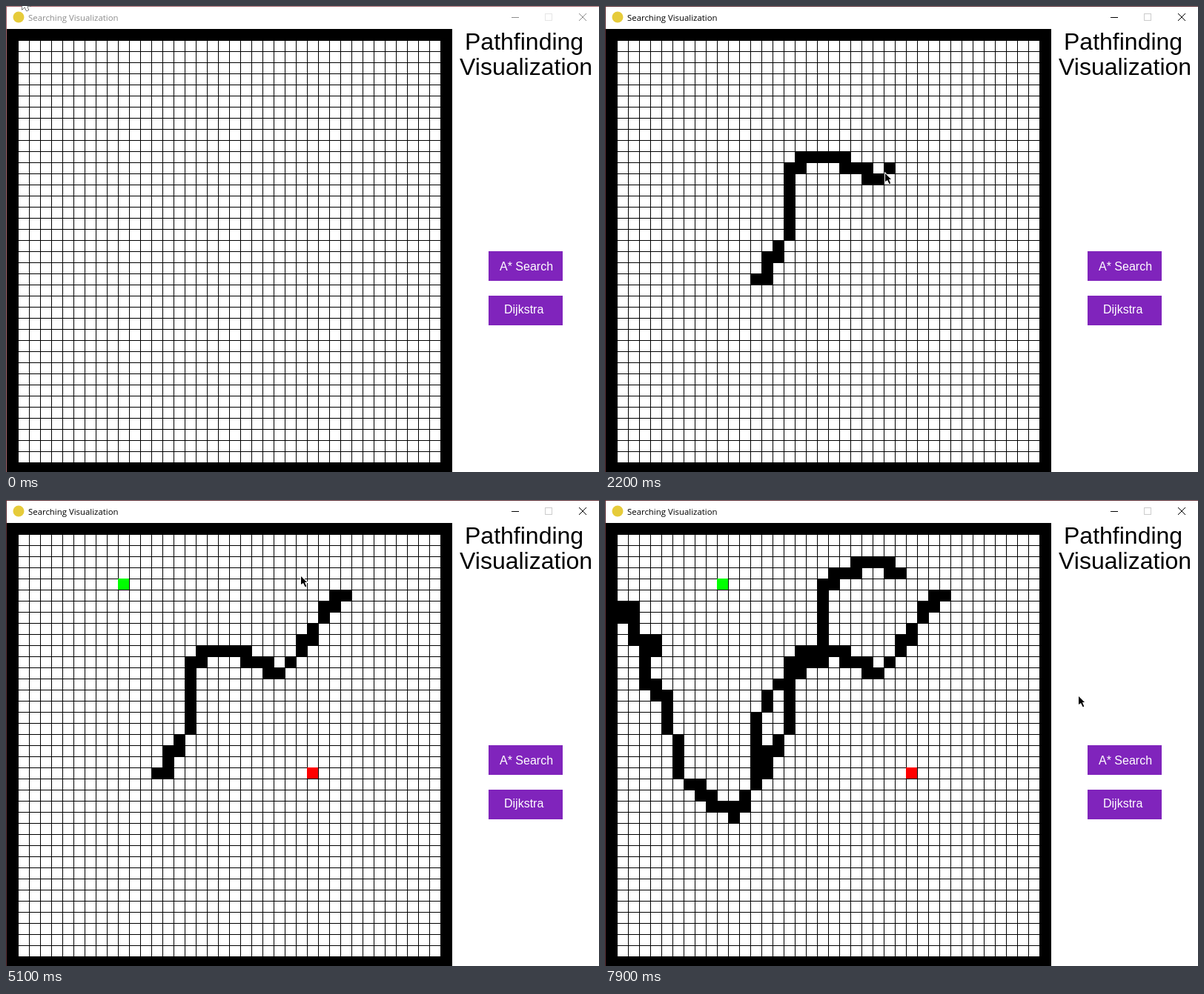
Recreate the animation shown at these times as an HTML page with a canvas. Size 800 px wide and 629 px high, loop 8 s.

```html
<!DOCTYPE html>
<html lang="en">
<head>
<meta charset="utf-8">
<title>Searching Visualization</title>
<style>
  html, body { margin: 0; width: 100%; height: 100%; overflow: hidden; background: #fff; }
  canvas { display: block; }
</style>
</head>
<body>
<canvas id="stage" width="800" height="629"></canvas>
<script>
const ctx = document.getElementById("stage").getContext("2d");
const LOOP = 8000, STEP = 100, CELL = 15, LEFT = 16, TOP = 46, SIZE = 38;
const ACTIVE_AT = 1500, START_AT = 3300, GOAL_AT = 4300;
const FACE = "'Liberation Sans', Arial, sans-serif";

const pointer = new Path2D("M1 1L9 9H6L8 14V15H6.5L4 10L1 12Z");
const systemArrow = new Path2D("M.5.5V17L4.5 13.5L6.5 18.5L9.5 17.5L7.5 12.5H12Z");

// The mouse goes through a chain of moves, measured in grid cells.
// A glide is eased; a stroke has constant speed and paints each cell it enters.
const moves = [], walls = [];
let lastTime = 0, lastPoint = [0.33, -3.87];

function addMove(end, text, paints) {
  const points = [lastPoint, ...text.split(" ").map(p => p.split(",").map(Number))];
  const move = { start: lastTime, end, points, paints };
  moves.push(move);
  if (paints)
    for (let t = move.start; t < end; t += 4)
      walls.push({ t, cell: along(move, t).map(Math.floor) });
  lastTime = end;
  lastPoint = points[points.length - 1];
}
const glide = (end, point) => addMove(end, point, false);
const stroke = (end, points) => addMove(end, points, true);
const rest = end => glide(end, lastPoint.join());

function along({ start, end, points, paints }, t) {
  let u = Math.min(1, (t - start) / (end - start));
  if (!paints) u = u * u * (3 - 2 * u);
  const lengths = points.slice(1).map((p, i) => Math.hypot(p[0] - points[i][0], p[1] - points[i][1]));
  let left = u * lengths.reduce((a, b) => a + b), i = 0;
  while (i < lengths.length - 1 && left > lengths[i]) left -= lengths[i++];
  const part = lengths[i] ? left / lengths[i] : 0;
  return points[i].map((v, k) => v + (points[i + 1][k] - v) * part);
}

glide(300, "3.2,1.53");
rest(500);
glide(1398, "12.2,21.87");
stroke(2200, "13.1,21.3 15.05,17.9 15.4,11.6 17,10.3 20,10.7 23.3,12.68 24.07,11.93");
stroke(2550, "25.05,10.95 27.05,7.92 29.5,5.2");
glide(3300, "9.47,4.47");
glide(4300, "27,21.07");
rest(4500);
glide(5100, "25.4,3.73");
stroke(5700, "24.2,2.7 22.02,2.98 19.4,4.05 18.5,4.5 18.4,11.2 16.7,11.75 13.96,14.03");
rest(5800);
stroke(6000, "12.97,16.04 12.53,21.33");
stroke(7000, "11.98,23.02 10.97,25.02 10.6,25.2 8.6,24.1 5.97,21.97 4.99,17.97 4.2,14.8 " +
  "2.5,12.9 2.4,10.6 3.4,10.3 3.2,9.4 1.5,9.3 1.3,7.4 0.4,7.2 0.5,6.5 1.3,6.3");
glide(7600, "22.47,2.53");
glide(7900, "41.47,14.53");

function box(color, x, y, w, h) {
  ctx.fillStyle = color;
  ctx.fillRect(x, y, w, h);
}

function label(text, x, y, font, color) {
  ctx.font = font;
  ctx.fillStyle = color;
  ctx.fillText(text, x, y);
}

function paintCell(color, col, row) {
  box(color, LEFT + col * CELL, TOP + row * CELL, CELL, CELL);
}

function drawWindow(active) {
  const ink = active ? "#000" : "#8c8c8c", edge = active ? "#5c2d33" : "#a5636a";
  box("#fff", 0, 0, 800, 629);
  box(edge, 0, 0, 800, 1);
  box(edge, 0, 0, 1, 629);

  ctx.fillStyle = "#e6cb3a";
  ctx.beginPath();
  ctx.arc(17, 15, 7.5, 0, 7);
  ctx.fill();
  label("Searching Visualization", 30, 20, "11.4px 'Open Sans', 'Noto Sans', sans-serif", ink);

  box(ink, 682, 15, 10, 1);
  ctx.lineWidth = 1;
  ctx.strokeStyle = active ? "#ccc" : "#e6e6e6";
  ctx.strokeRect(727.5, 10.5, 9, 9);
  ctx.strokeStyle = ink;
  ctx.stroke(new Path2D("M773 10L783 20M783 10L773 20"));
}

function drawPanel() {
  label("Pathfinding", 619, 59, "32px " + FACE, "#000");
  label("Visualization", 612, 93, "32px " + FACE, "#000");
  box("#8024bc", 651, 331, 100, 40);
  box("#8024bc", 651, 391, 100, 40);
  label("A* Search", 666, 357, "16px " + FACE, "#fff");
  label("Dijkstra", 672, 415, "16px " + FACE, "#fff");
}

function drawGrid(t) {
  box("#000", 1, 31, 601, 598);
  for (let r = 0; r < SIZE; r++)
    for (let c = 0; c < SIZE; c++)
      box("#fff", LEFT + 1 + c * CELL, TOP + 1 + r * CELL, CELL - 1, CELL - 1);
  for (const wall of walls)
    if (wall.t < t) paintCell("#000", ...wall.cell);
  if (t >= START_AT) paintCell("#0f0", 9, 4);
  if (t >= GOAL_AT) paintCell("#f00", 26, 21);
}

function drawCursor(t) {
  const [col, row] = along(moves.find(m => t <= m.end), t);
  const x = Math.round(LEFT + col * CELL), y = Math.round(TOP + row * CELL);
  const onTitleBar = y < 31;
  const shape = onTitleBar ? systemArrow : pointer;
  ctx.save();
  ctx.translate(x, y);
  ctx.lineWidth = onTitleBar ? 1 : 2;
  ctx.strokeStyle = onTitleBar ? "#000" : "#fff";
  ctx.fillStyle = onTitleBar ? "#fff" : "#000";
  ctx.stroke(shape);
  ctx.fill(shape);
  ctx.restore();
}

function draw(now) {
  const t = Math.floor(now % LOOP / STEP) * STEP;
  drawWindow(t >= ACTIVE_AT);
  drawPanel();
  drawGrid(t);
  drawCursor(t);
  requestAnimationFrame(draw);
}
requestAnimationFrame(draw);
</script>
</body>
</html>
```
